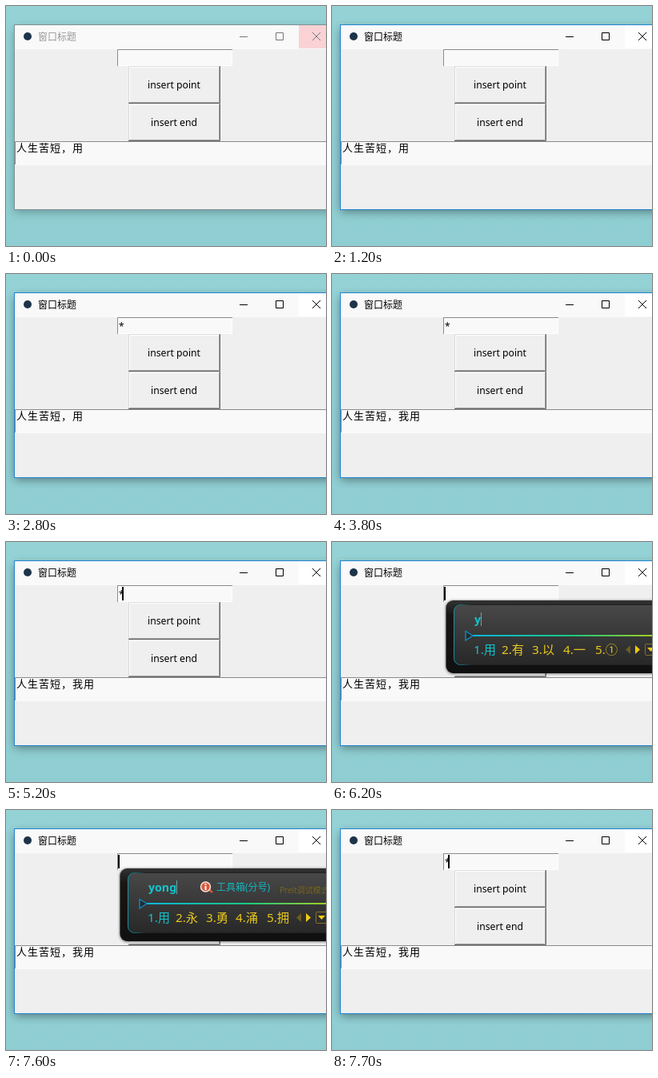
Animation, 400 px wide and 300 px high, one loop 8 s. Source, as an HTML page:

```html
<!DOCTYPE html>
<html lang="zh">
<head>
<meta charset="utf-8">
<style>
  html, body { margin: 0; width: 100%; height: 100%; overflow: hidden; }
  svg { display: block; width: 400px; height: 300px; }
  text { font-family: "Noto Sans", "Noto Sans CJK SC", "Noto Sans CJK", sans-serif; font-size: 12px; white-space: pre; }
  #content { font: 13px "Noto Sans CJK SC", "Noto Sans CJK", sans-serif; letter-spacing: 1px; }
  #typed { font-size: 14.2px; font-weight: bold; }
  .candidate { font-size: 15.3px; }
  .button text { text-anchor: middle; font-size: 12.2px; }
</style>
</head>
<body>
<svg viewBox="0 0 400 300">
  <defs>
    <linearGradient id="desktop" x2="0" y2="1">
      <stop stop-color="#94d2d6"/><stop offset="1" stop-color="#8ecdd1"/>
    </linearGradient>
    <linearGradient id="panel" x2="0" y2="1">
      <stop stop-color="#484848"/><stop offset="1" stop-color="#282828"/>
    </linearGradient>
    <linearGradient id="rim" x2="0" y2="1">
      <stop stop-color="#333"/><stop offset=".2" stop-color="#161616"/><stop offset="1" stop-color="#101010"/>
    </linearGradient>
    <linearGradient id="edge" x2="1" y2="0">
      <stop stop-color="#0b98a8"/><stop offset=".08" stop-color="#222"/>
    </linearGradient>
    <linearGradient id="rainbow" gradientUnits="userSpaceOnUse" x1="176" x2="420" y1="0" y2="0">
      <stop stop-color="#0eb4dc"/><stop offset=".5" stop-color="#18c884"/><stop offset="1" stop-color="#b8d010"/>
    </linearGradient>
    <filter id="blur" x="-20%" y="-20%" width="140%" height="140%"><feGaussianBlur stdDeviation="6"/></filter>
    <filter id="soft" x="-10%" y="-20%" width="120%" height="140%"><feGaussianBlur stdDeviation="1.5"/></filter>
  </defs>

  <rect width="400" height="300" fill="url(#desktop)"/>
  <rect id="shadow" x="11" y="28" width="430" height="229" filter="url(#blur)"/>
  <rect x="11" y="24" width="400" height="230" fill="#efefef"/>
  <rect x="11" y="24" width="400" height="30" fill="#f9f9f9"/>
  <rect id="close" x="366" y="24" width="34" height="29"/>
  <rect id="border" x="10.5" y="23.5" width="420" height="231" fill="none"/>
  <circle cx="27" cy="38" r="5" fill="#1d3349"/>
  <text id="title" x="40" y="43">窗口标题</text>
  <g id="controls" fill="none">
    <path d="M292 38.5h10M337.500 33.500h9v9h-9z"/>
    <path d="M383 33l10 10M393 33l-10 10"/>
  </g>

  <rect x="139" y="54" width="144" height="21" fill="#f9f9f9"/>
  <path d="M139.500 75V54.500H283" fill="none" stroke="#8b8b8b"/>
  <path d="M282.500 55V74.500H140" fill="none" stroke="#fff"/>
  <text id="entry" x="141" y="70">*</text>
  <rect id="entryCursor" y="56" width="2" height="17"/>

  <g class="button" transform="translate(153 75)">
    <g id="pressedEdge"></g>
    <text id="pressedLabel" x="57" y="28">insert point</text>
  </g>
  <g class="button" transform="translate(153 122)">
    <g id="raisedEdge"></g>
    <text x="57" y="28">insert end</text>
  </g>

  <rect x="11" y="169" width="400" height="30" fill="#f9f9f9"/>
  <path d="M11.500 198V169.500H400" fill="none" stroke="#8b8b8b"/>
  <text id="content" x="13" y="182"></text>
  <rect id="textCursor" y="171" width="2" height="13"/>

  <g id="ime">
    <rect x="142" y="73" width="290" height="92" rx="9" opacity=".5" filter="url(#soft)"/>
    <rect x="142.500" y="73" width="290" height="91" rx="9" fill="url(#rim)"/>
    <rect x="152.500" y="78.500" width="280" height="75" rx="8" fill="url(#panel)" stroke="url(#edge)"/>
    <path d="M176 117H400" stroke="url(#rainbow)" stroke-width="2"/>
    <path d="M167 111.500l9 5.500l-9 6z" fill="#252b2e" stroke="#1189bd" stroke-width="1.400"/>
    <text id="typed" x="178" y="102" fill="#12c4cc"></text>
    <rect id="caret" y="88" width="1" height="17" fill="#5fa9ac"/>
    <g id="candidates"></g>
    <g id="pager">
      <path d="M373 129v11l-6-5.500z" fill="#6d5c1c"/>
      <path d="M379 129v11l6-5.500z" fill="#efcb10"/>
      <rect x="391.500" y="127.500" width="14" height="14" rx="1" fill="none" stroke="#877329"/>
      <path d="M394 132h9l-4.500 5z" fill="#efcb10"/>
    </g>
    <g id="toolbox">
      <path d="M253 99l5 4" stroke="#d9573c" stroke-width="2.500"/>
      <circle cx="249.500" cy="96" r="6" fill="#d9573c" stroke="#f7e8e2" stroke-width="1.500"/>
      <path d="M249.500 92v2M249.500 95v5" stroke="#fff" stroke-width="2"/>
      <text x="263" y="101" fill="#12b9c1">工具箱(分号)</text>
      <text x="342" y="104" fill="#766420" style="font-size:10px">Prelt调试模式</text>
    </g>
  </g>
</svg>
<script>
const DURATION = 8000;
const OFF = null;
const $ = id => document.getElementById(id);

// Each track is a list of [start time, value]; values hold until the next entry.
const tracks = {
  active: [[0, false], [700, true]],
  closeHover: [[0, true], [100, false]],
  entry: [[0, ''], [2700, '*'], [5800, ''], [7700, '*']],
  entryCursor: [[0, OFF], [1400, 140], [2000, OFF], [2300, 140], [2700, 145], [2800, OFF],
    [3100, 145], [3700, OFF], [3900, 145], [4400, OFF], [5200, 145], [5700, OFF],
    [6000, 140], [6500, OFF], [6900, 140], [7400, OFF], [7600, 140], [7700, 145]],
  textCursor: [[0, OFF], [700, 82], [1200, OFF], [4600, 110], [5200, OFF]],
  pressed: [[0, false], [3600, true], [3800, false]],
  content: [[0, '人生苦短，用'], [3800, '人生苦短，我用']],
  typed: [[0, ''], [2000, 'w'], [2200, 'wo'], [2600, ''], [6200, 'y'], [6400, 'yo'],
    [6700, 'yon'], [6800, 'yong'], [7700, '']]
};
const suggestions = {
  w: '我为无玩⑤', wo: '我握窝卧沃', y: '用有以一①',
  yo: '哟有用又由', yon: '用永勇涌拥', yong: '用永勇涌拥'
};

const valueAt = (track, t) => track.findLast(([start]) => start <= t)[1];
const show = (id, visible) => $(id).style.display = visible ? '' : 'none';
const set = (id, attributes) => {
  for (const name in attributes) $(id).setAttribute(name, attributes[name]);
};
const setText = (id, text) => {
  if ($(id).textContent !== text) $(id).textContent = text;
};

function buttonEdge(pressed) {
  const [light, dark] = pressed ? ['#6b6b6b', '#fff'] : ['#fff', '#696969'];
  return `<rect width="115" height="47" fill="#efefef"/>
    <path d="M.5 47V.5H115" fill="none" stroke="${pressed ? light : '#d9d9d9'}"/>
    <path d="M1.5 46V1.500H114" fill="none" stroke="${light}"/>
    <path d="M114.500 0V46.500H0" fill="none" stroke="${dark}"/>
    <path d="M113.500 1V45.500H1" fill="none" stroke="${pressed ? '#e3e3e3' : '#a0a0a0'}"/>`;
}

function drawCursor(id, x) {
  show(id, x !== OFF);
  if (x !== OFF) set(id, { x });
}

function drawIme(typed, t) {
  show('ime', typed);
  if (!typed) return;
  const single = typed.length === 1;
  const columns = single ? [177, 212, 250, 289, 329] : [177, 212, 250, 287, 326];
  setText('typed', typed);
  set('caret', { x: Math.round(178 + $('typed').getComputedTextLength()) });
  $('candidates').innerHTML = [...suggestions[typed]].map((word, i) =>
    `<text class="candidate" x="${columns[i]}" y="140" fill="${i ? '#e8c81c' : '#12c4cc'}">${i + 1}.${word}</text>`
  ).join('');
  set('pager', { transform: `translate(${single ? 0 : -4} 0)` });
  const fade = Math.floor((t - 7100) / 100) / 4;
  set('toolbox', { opacity: Math.max(0, Math.min(1, fade)) });
}

function draw(t) {
  const state = {};
  for (const name in tracks) state[name] = valueAt(tracks[name], t);
  const { active, closeHover, pressed } = state;

  set('shadow', { opacity: active ? .42 : .3 });
  set('border', { stroke: active ? '#2484d0' : '#7d9294' });
  set('title', { fill: active ? '#000' : '#999' });
  set('controls', { stroke: active ? '#000' : '#777' });
  set('close', { fill: closeHover ? '#fad2d6' : '#fff' });

  setText('entry', state.entry);
  setText('content', state.content);
  drawCursor('entryCursor', state.entryCursor);
  drawCursor('textCursor', state.textCursor);
  $('pressedEdge').innerHTML = buttonEdge(pressed);
  set('pressedLabel', { transform: pressed ? 'translate(1 1)' : '' });
  drawIme(state.typed, t);
}

$('raisedEdge').innerHTML = buttonEdge(false);
const begin = performance.now();
function tick() {
  draw((performance.now() - begin) % DURATION);
  requestAnimationFrame(tick);
}
tick();
</script>
</body>
</html>
```
